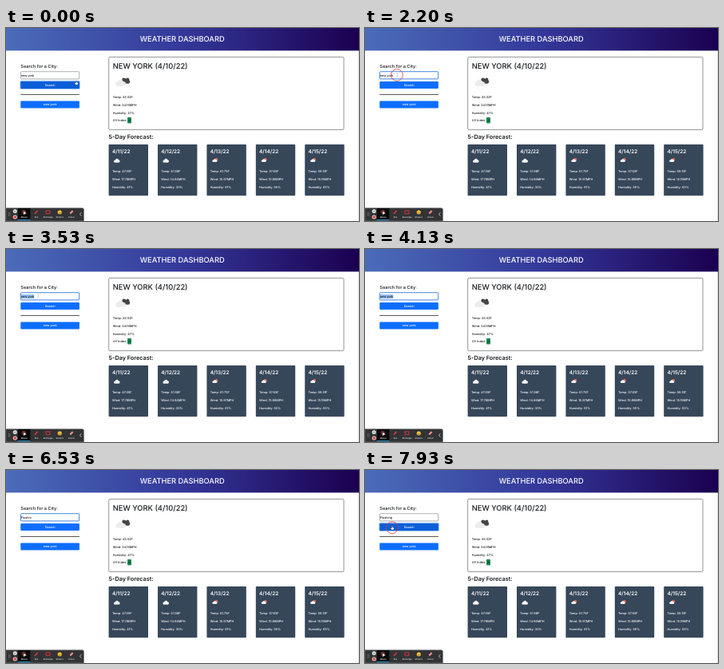
These frames come from a looping animation (442 by 242 pixels, 8000 ms). An HTML page:

```html
<!DOCTYPE html>
<html lang="en">
<head>
<meta charset="utf-8">
<title>Weather Dashboard</title>
<style>
  html, body { margin: 0; width: 100%; height: 100%; overflow: hidden; background: #fff; }
  svg { display: block; width: 442px; height: 242px; }
  text { font: 500 3.8px Inter, sans-serif; fill: #16191c; text-rendering: geometricPrecision; }
  .h1 { font-size: 9.3px; }
  .h3 { font-size: 6.4px; font-weight: 600; }
  .h4 { font-size: 5.65px; }
  .mid { text-anchor: middle; }
  .light, .card text { fill: #fff; }
  .bar text { font-size: 2.5px; fill: #eee; text-anchor: middle; }
</style>
</head>
<body>
<svg viewBox="0 0 442 242">
  <defs>
    <linearGradient id="sky">
      <stop offset="0" stop-color="#4b6cb9"/>
      <stop offset=".5" stop-color="#34389a"/>
      <stop offset="1" stop-color="#1b0050"/>
    </linearGradient>
    <path id="cloud" d="M2.2 7.5a2.2 2.2 0 0 1 0-4.4A3 3 0 0 1 7.8 2.6A2.5 2.5 0 0 1 8.4 7.5z"/>
  </defs>

  <rect x="441" y="28" width="1" height="214" fill="#dcdcdc"/>
  <rect width="442" height="28.4" fill="url(#sky)"/>
  <text class="h1 mid light" x="220.7" y="17">WEATHER DASHBOARD</text>

  <text class="h4" x="18.3" y="50">Search for a City:</text>
  <rect id="field" x="18.5" y="54.7" width="73.2" height="9.2" rx=".8" fill="#fff"/>
  <rect id="mark" y="57" height="5.2" fill="#8fbcf0"/>
  <text id="city" x="18.8" y="60.7"></text>
  <rect id="ring" x="17.3" y="65.8" width="75.6" height="11.2" rx="1.8" fill="#9cc3fb"/>
  <rect id="search" x="18.3" y="66.9" width="73.6" height="9.1" rx="1"/>
  <text class="mid light" x="55.2" y="72.8">Search</text>
  <rect x="18.3" y="83" width="73.6" height=".9" fill="#444"/>
  <rect x="18.3" y="91.6" width="73.6" height="9" rx="1" fill="#0d6efd"/>
  <text class="mid light" x="55.2" y="97.4">new york</text>

  <rect x="128.7" y="36.4" width="294.3" height="91.2" rx="1.5" fill="none" stroke="#777a7d" stroke-width=".8"/>
  <text class="h1" x="133.8" y="50.7">NEW YORK (4/10/22)</text>
  <use href="#cloud" transform="translate(137.3 63.3) scale(1.25)" fill="#ececee"/>
  <g fill="#454547">
    <ellipse cx="148.3" cy="65" rx="3" ry="2.2" transform="rotate(30 148.3 65)"/>
    <ellipse cx="152.2" cy="67.4" rx="3" ry="2.3"/>
    <circle cx="152.3" cy="64.7" r="2.1"/>
  </g>
  <text x="133.8" y="88">Temp: 45.52F</text>
  <text x="133.8" y="97.7">Wind: 24.16MPH</text>
  <text x="133.8" y="107.5">Humidity: 47%</text>
  <text x="133.8" y="117.3">UV Index:</text>
  <rect x="152" y="112" width="5" height="7.4" rx="1" fill="#198754"/>
  <text class="mid" x="154.5" y="117.2">4</text>

  <text class="h3" x="128.6" y="139" style="font-size:7.25px">5-Day Forecast:</text>
  <g id="days"></g>

  <g class="bar">
    <path d="M0 225.7H95.5a2 2 0 0 1 2 2V242H0z" fill="#323335" stroke="#77787a" stroke-width=".6"/>
    <rect x="15" y="226" width="15.5" height="15" fill="#0b0b0c"/>
    <rect x="15" y="240.2" width="15.5" height="1" fill="#2f9bdc"/>
    <path d="M3.5 231v5M5 231v5" stroke="#777" stroke-width=".6"/>
    <circle cx="11.3" cy="229.8" r="2.5" fill="#e8e8e8"/>
    <path d="M10.3 228.8l2 2m0-2l-2 2" stroke="#333" stroke-width=".5"/>
    <circle cx="11.3" cy="237" r="2.5" fill="#e8e8e8"/>
    <circle cx="11.3" cy="237" r="1.7" fill="#e23a3a"/>
    <circle cx="22.3" cy="230.6" r="2.1" fill="none" stroke="#e0483f" stroke-width=".8"/>
    <path d="M21.8 229.6l4 3-2 .2-1.3 1.6z" fill="#fff"/>
    <path d="M36 233l3.6-4" stroke="#e3343f" stroke-width="1.6"/>
    <rect x="50" y="229" width="5" height="3.8" fill="none" stroke="#e3343f" stroke-width=".9"/>
    <circle cx="67.3" cy="231" r="2.6" fill="#f3bd3c"/>
    <path d="M65.9 231.5q1.4 1.8 2.8 0" stroke="#6a4515" stroke-width=".5" fill="none"/>
    <path d="M80.3 232.6l3.4-3.4" stroke="#ee8d91" stroke-width="2.2"/>
    <text x="22.7" y="238.2">Mouse</text>
    <text x="38" y="238.2">Pen</text>
    <text x="52.7" y="238.2">Rectangle</text>
    <text x="67.3" y="238.2">Stickers</text>
    <text x="82" y="238.2">Eraser</text>
    <path d="M94.3 231.3l-1.8 2.2 1.8 2.2" fill="none" stroke="#ddd" stroke-width=".8"/>
  </g>

  <circle id="press" r="7.4" fill="none" stroke="#dc3a3e" stroke-width=".8"/>
  <path id="beam" d="M-.7-2H.7M0-2V2M-.7 2H.7" stroke="#999" stroke-width=".4"/>
  <path id="hand" d="M-.6-2.2q.6-.6 1 0v1.6l1.9.5v1.6l-.6 1.3H-.9L-2.1.6l.5-.5 1 .5z" fill="#fff" stroke="#222" stroke-width=".4"/>
</svg>
<script>
const LOOP = 8000;
const $ = id => document.getElementById(id);

const days = [
  ["4/11/22", "47.05F", "17.78MPH", "41%"],
  ["4/12/22", "51.58F", "14.94MPH", "30%"],
  ["4/13/22", "61.75F", "15.97MPH", "61%", true],
  ["4/14/22", "57.63F", "15.89MPH", "55%", true],
  ["4/15/22", "59.51F", "15.19MPH", "63%", true]
];
const fair = '<use href="#cloud" transform="translate(6.4 17.2) scale(.75)" fill="#f4f4f4"/>';
const rainy = `
  <circle cx="12" cy="19" r="1.9" fill="#e4705a"/>
  <use href="#cloud" transform="translate(6.9 17.6) scale(.6)" fill="#f4f4f4"/>`;

$("days").innerHTML = days.map(([date, temp, wind, wet, rain], i) => `
  <g class="card" transform="translate(${128.6 + i * 61.4} 146)">
    <rect width="49.4" height="64.2" rx=".8" fill="#36475a"/>
    <text class="h3" x="4.3" y="10.8">${date}</text>
    ${rain ? rainy : fair}
    <text x="4.3" y="35">Temp: ${temp}</text>
    <text x="4.3" y="44.8">Wind: ${wind}</text>
    <text x="4.3" y="54.6">Humidity: ${wet}</text>
  </g>`).join("");

// Pointer path: time, x, y
const path = [
  [0, 88, 68.5], [530, 66, 74], [730, 66, 74], [860, 54, 74], [1130, 54, 74],
  [1330, 46, 67], [1530, 46, 67], [1660, 40, 59], [2200, 40, 59], [2600, 27.5, 60],
  [3000, 12.5, 60], [6930, 14, 60], [7330, 29, 65], [7660, 34, 72.3], [8000, 34, 72.3]
];
const keys = [[5000, "F"], [5200, "Fl"], [5460, "Flu"], [6000, "Flus"], [6130, "Flush"],
  [6330, "Flushi"], [6460, "Flushin"], [6600, "Flushing"]];

function pointer(t) {
  const i = path.findIndex(p => p[0] > t);
  const [t0, x0, y0] = path[i - 1], [t1, x1, y1] = path[i];
  const k = (t - t0) / (t1 - t0);
  return [x0 + (x1 - x0) * k, y0 + (y1 - y0) * k];
}

const within = (t, a, b) => t >= a && t < b;
const show = (el, on) => el.setAttribute("visibility", on ? "visible" : "hidden");
const place = (el, x, y) => el.setAttribute("transform", `translate(${x} ${y})`);
const paint = (el, attrs) => Object.entries(attrs).forEach(([k, v]) => el.setAttribute(k, v));

function draw(t) {
  const [x, y] = pointer(t);
  const dragging = within(t, 2200, 3060);
  const focused = within(t, 2200, 7860);
  const hover = x > 18 && x < 92 && y > 66.8 && y < 76;

  const typed = keys.filter(k => t >= k[0]).pop();
  $("city").textContent = typed ? typed[1] : "new york";
  paint($("field"), focused
    ? { stroke: "#4686dc", "stroke-width": 1 }
    : { stroke: "#8d9095", "stroke-width": .7 });
  $("search").setAttribute("fill", hover || !focused ? "#0b5ed7" : "#0d6efd");
  show($("ring"), !focused);

  // Selection grows leftwards as the pointer is dragged
  const left = Math.max(18.8, Math.min(35.2, x));
  show($("mark"), within(t, 2200, 5000));
  paint($("mark"), { x: left, width: 35.2 - left });

  show($("press"), dragging || t >= 7860);
  place($("press"), x, y);

  const resting = within(t, 1660, 4130);
  show($("beam"), resting || (t >= 6930 && !hover));
  place($("beam"), resting ? 40.3 : x, resting ? 58.8 : y);
  show($("hand"), hover);
  place($("hand"), x, y);
}

function tick() {
  draw(performance.now() % LOOP);
  requestAnimationFrame(tick);
}
tick();
</script>
</body>
</html>
```
